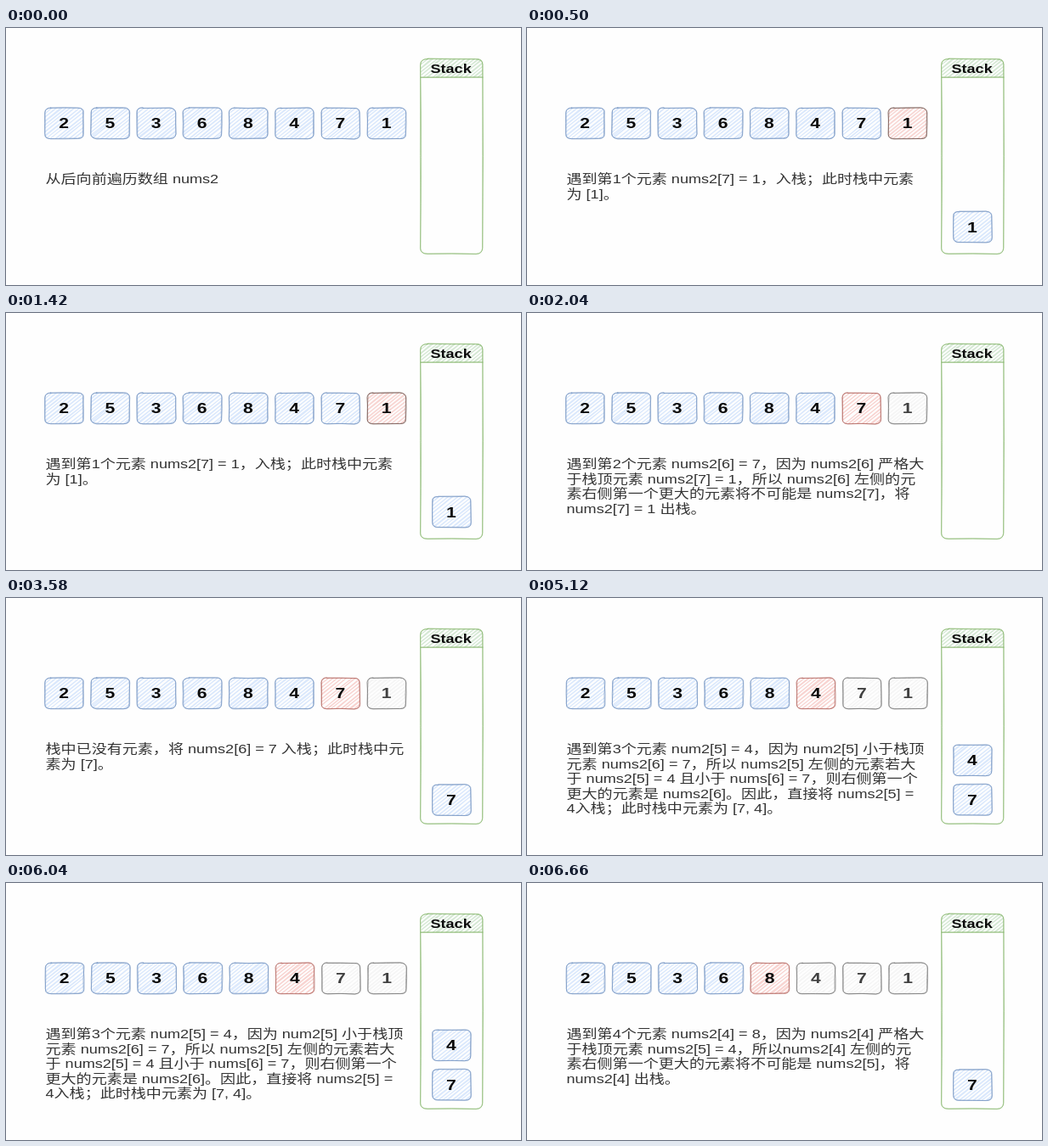
An HTML page that plays this animation: 606x303 px, repeating every 8000 ms.

```html
<!DOCTYPE html>
<html lang="zh-CN">
<head>
<meta charset="utf-8">
<title>单调栈遍历 nums2</title>
<style>
  html, body { margin: 0; width: 100%; height: 100%; overflow: hidden; background: #fefefe; }
  #strip { display: flex; width: 3636px; height: 303px; animation: scenes 8s step-end infinite; }
  svg { flex: none; width: 606px; height: 303px; }
  text { font-family: "Liberation Sans", "Noto Sans CJK SC", "Noto Sans CJK", sans-serif; font-size: 12px; font-weight: 300; fill: #333; white-space: pre; }
  .digit { font-size: 14px; font-weight: bold; text-anchor: middle; fill: #0a0a0a; }
  .title { font-weight: bold; text-anchor: middle; fill: #0a0a0a; }
  .done { fill: #404040; }
  path { fill: none; stroke-linecap: round; }
  @keyframes scenes {
    0% { transform: translateX(0); }
    6.25% { transform: translateX(-606px); }
    25.5% { transform: translateX(-1212px); }
    44.75% { transform: translateX(-1818px); }
    64% { transform: translateX(-2424px); }
    83.25% { transform: translateX(-3030px); }
  }
</style>
</head>
<body>
<div id="strip"></div>
<script>
const NUMS = [2, 5, 3, 6, 8, 4, 7, 1];
const BLUE = { line: '#6c8ebf', fill: '#dae8fc' };
const RED = { line: '#b0605a', fill: '#f8d3d0' };
const DARK_RED = { line: '#70504a', fill: '#f8d6d3' };
const GREEN = { line: '#82b366', fill: '#d5e8d4' };
const PLAIN = { line: '#707070', fill: '#f5f5f5' };

// at: index being visited; stack: [digit, y] pairs
const SCENES = [
  { at: 8, stack: [], lines: ['从后向前遍历数组 nums2'] },
  { at: 7, look: DARK_RED, stack: [[1, 178.7]], lines: [
    '遇到第1个元素 nums2[7] = 1，入栈；此时栈中元素',
    '为 [1]。'] },
  { at: 6, stack: [], lines: [
    '遇到第2个元素 nums2[6] = 7，因为 nums2[6] 严格大',
    '于栈顶元素 nums2[7] = 1，所以 nums2[6] 左侧的元',
    '素右侧第一个更大的元素将不可能是 nums2[7]，将',
    'nums2[7] = 1 出栈。'] },
  { at: 6, stack: [[7, 181.7]], lines: [
    '栈中已没有元素，将 nums2[6] = 7 入栈；此时栈中元',
    '素为 [7]。'] },
  { at: 5, shift: 0.4, stack: [[7, 181.4], [4, 143]], lines: [
    '遇到第3个元素 num2[5] = 4，因为 num2[5] 小于栈顶',
    '元素 nums2[6] = 7，所以 nums2[5] 左侧的元素若大',
    '于 nums2[5] = 4 且小于 nums[6] = 7，则右侧第一个',
    '更大的元素是 nums2[6]。因此，直接将 nums2[5] =',
    '4入栈；此时栈中元素为 [7, 4]。'] },
  { at: 4, shift: 0.4, stack: [[7, 181.7]], lines: [
    '遇到第4个元素 nums2[4] = 8，因为 nums2[4] 严格大',
    '于栈顶元素 nums2[5] = 4，所以nums2[4] 左侧的元',
    '素右侧第一个更大的元素将不可能是 nums2[5]，将',
    'nums2[4] 出栈。'] },
];

let seed = 1, clips = 0;
function random() {
  seed = (seed * 16807) % 2147483647;
  return seed / 2147483647;
}
const near = (v, amount = 0.6) => (v + (random() * 2 - 1) * amount).toFixed(2);
const point = (x, y, amount) => near(x, amount) + ' ' + near(y, amount);

const path = (d, color, width) => `<path d="${d}" stroke="${color}" stroke-width="${width}"/>`;
const label = (x, y, text, name = '') => `<text x="${x}" y="${y}" class="${name}">${text}</text>`;

// Rounded outline drawn twice by an unsteady hand
function outline(x, y, w, h, color, r = 4.5) {
  const right = x + w, bottom = y + h;
  let d = '';
  for (let pass = 0; pass < 2; pass++) {
    const bend = (cx, cy, ex, ey, amount) => `Q${point(cx, cy, amount)} ${point(ex, ey, 0.4)}`;
    const across = 0.7 + w * 0.005, down = 0.7 + h * 0.005;
    d += `M${point(x + r, y, 0.4)}`
      + bend(x + w / 2, y, right - r, y, across) + bend(right, y, right, y + r)
      + bend(right, y + h / 2, right, bottom - r, down) + bend(right, bottom, right - r, bottom)
      + bend(x + w / 2, bottom, x + r, bottom, across) + bend(x, bottom, x, bottom - r)
      + bend(x, y + h / 2, x, y + r, down) + bend(x, y, x + r, y);
  }
  return path(d, color, 0.46);
}

function hatch(x, y, w, h, color) {
  const id = 'clip' + clips++;
  let d = '';
  for (let k = 2; k < w + h; k += 3.6)
    for (let pass = 0; pass < 2; pass++)
      d += `M${point(x + k, y)}L${point(x + k - h, y + h)}`;
  return `<clipPath id="${id}"><rect x="${x}" y="${y}" width="${w}" height="${h}" rx="4"/></clipPath>`
    + `<g clip-path="url(#${id})">${path(d, color, 0.9)}</g>`;
}

function cell(x, y, digit, look) {
  return hatch(x, y, 30, 30, look.fill)
    + outline(x, y, 30, 30, look.line)
    + label(x + 14.8, y + 20, digit, look === PLAIN ? 'digit done' : 'digit');
}

function stackBox() {
  const x = 324, y = 30, w = 48.4, divide = 48;
  const stroke = () => `M${point(x, divide, 0.3)}L${point(x + w, divide, 0.3)}`;
  return hatch(x, y, w, 18, GREEN.fill) + outline(x, y, w, 190, GREEN.line, 5.5)
    + path(stroke() + stroke(), GREEN.line, 0.46)
    + label(347.7, 44, 'Stack', 'title');
}

function draw({ at, look = RED, shift = 0, stack, lines }) {
  seed = 4321;
  const lookOf = i => i < at ? BLUE : i > at ? PLAIN : look;
  return '<svg viewBox="0 0 402.4 250.2" preserveAspectRatio="none">'
    + stackBox()
    + NUMS.map((n, i) => cell(30.4 + shift + 36 * i, 77.8, n, lookOf(i))).join('')
    + stack.map(([n, y]) => cell(333.1, y, n, BLUE)).join('')
    + lines.map((line, i) => label(30.9, 151.4 + 14.4 * i, line)).join('')
    + '</svg>';
}

document.getElementById('strip').innerHTML = SCENES.map(draw).join('');
</script>
</body>
</html>
```
